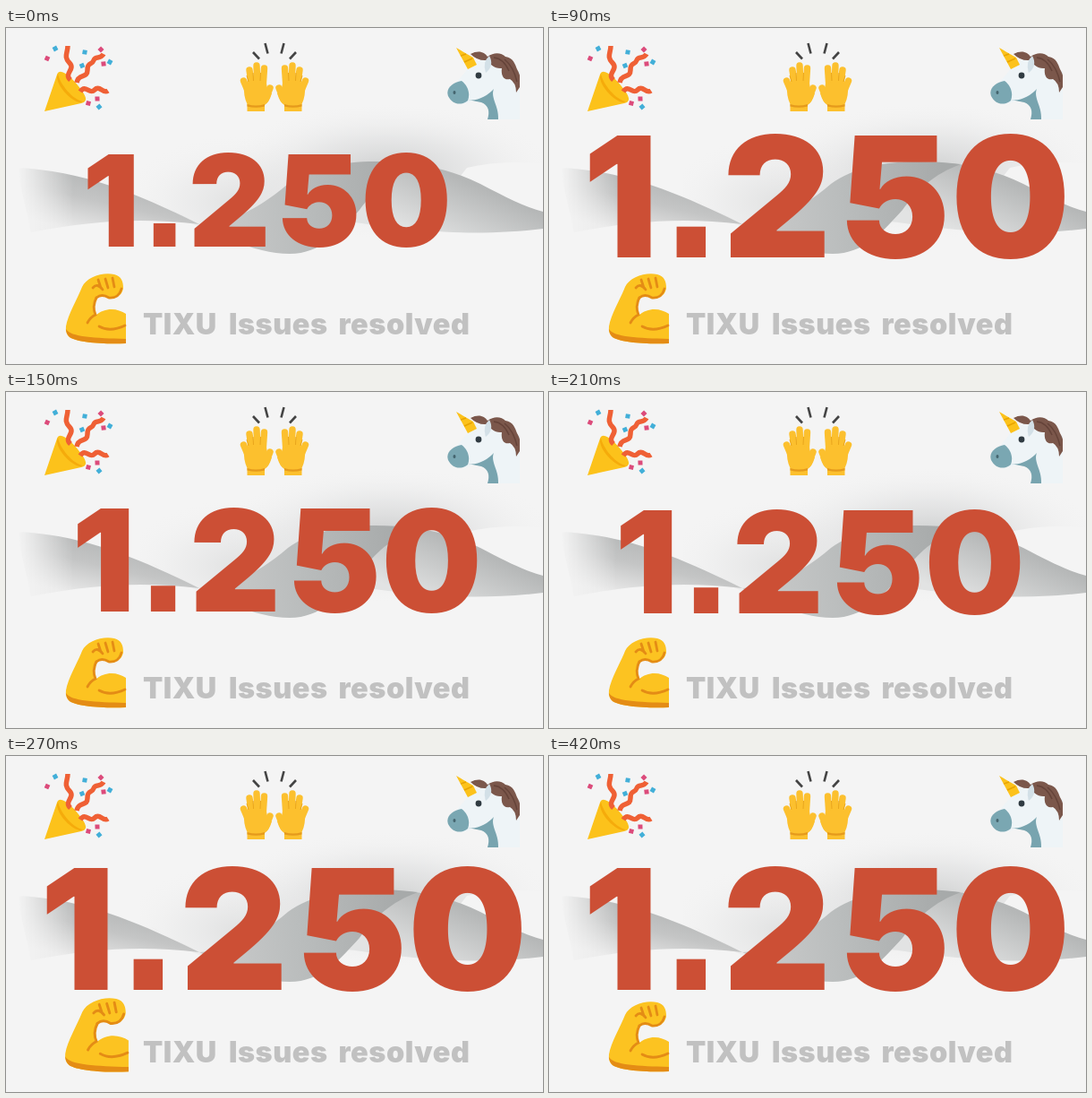
Animation, 600 px wide and 375 px high, one loop 1.53 s. Source, as an HTML page:

```html
<!DOCTYPE html>
<html lang="en">
<head>
<meta charset="utf-8">
<title>Issues resolved</title>
<style>
  html, body { margin: 0; width: 100%; height: 100%; overflow: hidden; background: #f4f4f4; }
  svg { display: block; width: 600px; height: 375px; }
  text { font-family: Inter, "Liberation Sans", sans-serif; }
  #count { font-size: 187.5px; font-weight: 900; fill: #cc4f35; }
  #count .point { font: 700 230px "Liberation Sans", sans-serif; }
  #label { font-size: 32.5px; font-weight: 900; letter-spacing: .5px; fill: #c1c1c1; }
</style>
</head>
<body>
<svg viewBox="0 0 600 375">
  <defs>
    <radialGradient id="paper" gradientUnits="userSpaceOnUse" r="1" gradientTransform="translate(310 205) scale(330 190)">
      <stop stop-color="#e5e5e5"/><stop offset=".5" stop-color="#ececec"/><stop offset="1" stop-color="#f4f4f4"/>
    </radialGradient>
    <linearGradient id="left" gradientUnits="userSpaceOnUse" x1="95" y1="160" x2="80" y2="226">
      <stop stop-color="#b4b6b6"/><stop offset=".45" stop-color="#c4c5c5"/><stop offset="1" stop-color="#e9e9e9"/>
    </linearGradient>
    <linearGradient id="fade" gradientUnits="userSpaceOnUse" x1="14" x2="75">
      <stop stop-color="#000"/><stop offset="1" stop-color="#fff"/>
    </linearGradient>
    <mask id="soft"><rect width="600" height="375" fill="url(#fade)"/></mask>
    <linearGradient id="mid" gradientUnits="userSpaceOnUse" x1="215" y1="190" x2="440" y2="160">
      <stop stop-color="#cbcccc"/><stop offset=".5" stop-color="#b9bcbc"/><stop offset="1" stop-color="#a7aaaa"/>
    </linearGradient>
    <linearGradient id="right" gradientUnits="userSpaceOnUse" x1="470" y1="235" x2="500" y2="165">
      <stop stop-color="#e2e3e3"/><stop offset="1" stop-color="#b5b7b7"/>
    </linearGradient>
    <radialGradient id="haze">
      <stop stop-color="#bcbebe" stop-opacity=".7"/><stop offset=".5" stop-color="#cdcecf" stop-opacity=".35"/>
      <stop offset="1" stop-color="#eee" stop-opacity="0"/>
    </radialGradient>
    <clipPath id="above"><path d="M150 0H600V152C570 148 540 150 515 156L450 240 215 222 150 190Z"/></clipPath>
    <clipPath id="box"><path d="M490 20H574V102H490Z"/></clipPath>
  </defs>

  <rect width="600" height="375" fill="url(#paper)"/>
  <g clip-path="url(#above)">
    <ellipse cx="425" cy="160" rx="185" ry="75" fill="url(#haze)"/>
    <ellipse cx="260" cy="195" rx="130" ry="75" fill="url(#haze)" opacity=".5"/>
  </g>
  <path d="M12 156C85 159 145 184 216 219C150 211 95 215 28 228Z" fill="url(#left)" mask="url(#soft)"/>
  <path d="M370 158C430 142 485 152 530 174C557 188 580 200 600 205V224C560 229 510 230 470 226C430 224 395 216 365 215Z" fill="url(#right)"/>
  <path d="M160 190C180 200 200 211 216 219C252 238 285 252 317 252C352 252 372 228 395 203C412 180 430 163 460 152C402 145 350 149 315 174C284 200 255 217 216 219Z" fill="url(#mid)"/>

  <!-- party popper -->
  <path d="M43 93L57 52C60 43 73 55 81 65C89 75 93 82 84 84Z" fill="#fcc21b"/>
  <path d="M58 51C60 62 74 80 86 82C78 88 52 62 58 51Z" fill="#f5ab0b"/>
  <g fill="none" stroke="#ef6035" stroke-width="5.500">
    <path d="M72 58C64 51 78 46 71 39S69 28 69 20"/>
    <path d="M79 61C81 50 91 57 91 47S96 42 98 36S105 36 109 29"/>
    <path d="M83 71C89 62 93 75 99 69S108 74 114 70"/>
  </g>
  <g id="confetti"></g>

  <!-- raised hands -->
  <g id="hand">
    <g fill="none" stroke="#fcc02e" stroke-width="7.400" stroke-linecap="round">
      <path d="M271 72L265.500 59M275 68L272 47M281 66L280 42M287 68L288.500 45M290 80L295 67"/>
    </g>
    <path d="M266 62Q279 57 291 62L293 72 297 73Q294 83 289 86V93H269.500V85Q265 76 266 62Z" fill="#fcc02e"/>
    <path d="M271 60L269 53M276.500 59L276 50M284 59L284.500 50" stroke="#e9a51c"/>
    <path d="M269.500 85Q279 88 289 85V87.500Q279 90 269.500 87.500Z" fill="#e59a1c"/>
    <path d="M276 27L283 34.500M289.500 17L292.500 28.500" stroke="#444" stroke-width="2.600"/>
  </g>
  <use href="#hand" transform="matrix(-1 0 0 1 600 0)"/>

  <!-- unicorn -->
  <g clip-path="url(#box)">
    <path d="M538 102L546 55 574 48V102Z" fill="#eaf1f5"/>
    <path d="M518 42C530 32 548 31 560 40L574 66V102H541C548 91 544 82 532 78L514 84Q502 86 496 78C493 67 509 57 518 42Z" fill="#eef4f7"/>
    <path d="M509 59C516 64 519 73 516 81C507 88 498 84 494 76C491 67 499 61 509 59Z" fill="#7aa7b2"/>
    <path d="M516 80C526 82 538 76 545 68C541 78 551 87 550 102H538C541 93 539 86 531 83Z" fill="#78a4af"/>
    <path d="M503 22L522 33 526 41 516 46Z" fill="#fcc21b"/>
    <path d="M508 31L514 29M512 38L521 34" stroke="#e8a400" stroke-width="1.500"/>
    <path d="M519 29C528 24 535 27 538 32C546 26 554 28 558 32C567 33 569 41 571 46Q577 56 574 66L570 72Q570 61 563 57C555 59 553 51 554 45C546 46 541 40 537 36Q527 37 519 29Z" fill="#7b574b"/>
    <path d="M536 50Q532 38 540 31Q546 42 536 50Z" fill="#d3e0e7"/>
    <path d="M545 33Q556 34 562 48M557 35Q567 43 571 60" fill="none" stroke="#654339" stroke-width="1.500"/>
    <circle cx="528" cy="53" r="3.400" fill="#303b42"/>
    <ellipse cx="501" cy="72" rx="1.500" ry="2" fill="#44646d"/>
  </g>

  <!-- flexed arm -->
  <g id="arm">
    <path d="M67 333C69 320 80 302 85 289C90 278 108 272 121 275C129 277 131 283 131 290C130 298 124 302 115 301C109 300 104 297 101 301C98 308 98 315 100 321C111 311 125 313 134 319V352C108 353 80 351 71 345Q66 341 67 333Z" fill="#fcc321"/>
    <path d="M67 336C72 345 100 346 134 347V352C108 353 80 351 71 345Q67 341 67 336Z" fill="#e48c15"/>
    <g fill="none" stroke="#e48c15" stroke-width="2.800" stroke-linecap="round">
      <path d="M97 290Q102 284 108 292M106 290L103 281M114 290L111 280M121 289L119 279M101 301Q107 296 115 301Q126 302 129 291"/>
      <path d="M101 301Q96 311 100 320Q94 323 91 329M104 333Q116 340 133 332"/>
    </g>
  </g>

  <text id="label" y="342"><tspan x="153">TIXU</tspan><tspan x="249">Issues</tspan><tspan x="371.500">resolved</tspan></text>
  <text id="count">1<tspan class="point">.</tspan>250</text>
</svg>
<script>
const LOOP = 1530, STEP = 30;
const count = document.getElementById("count");
const arm = document.getElementById("arm");

// Confetti: x, y, colour
const pink = "#dc4b7b", blue = "#42afd8";
document.getElementById("confetti").innerHTML = [
  [46, 34, pink], [55, 23, blue], [88, 27, blue], [106, 24, pink], [109, 40, pink],
  [116, 38, blue], [85, 42, blue], [92, 84, pink], [104, 88, blue], [102, 79, pink]
].map(([x, y, c], i) =>
  `<rect x="-2.500" y="-2.500" width="5" height="5" fill="${c}" transform="translate(${x} ${y}) rotate(${25 + i * 37})"/>`
).join("");

// Centre the ink of each character on its place in the number
const pen = document.createElement("canvas").getContext("2d");
const digitFont = '900 187.5px Inter, "Liberation Sans", sans-serif';
const pointFont = '700 230px "Liberation Sans", sans-serif';
const centres = [79.5, 159, 254, 387, 515.5];
const places = [..."1.250"].map((ch, i) => {
  pen.font = ch === "." ? pointFont : digitFont;
  const m = pen.measureText(ch);
  return centres[i] + (m.actualBoundingBoxLeft - m.actualBoundingBoxRight) / 2;
});
count.setAttribute("x", places.join(" "));

// Every 90 ms: left edge, baseline, scale
const poses = [[89.5, 244, .757], [43, 255.5, 1], [95.5, 240, .762], [43, 261, 1]];

function numberPose(t) {
  const p = Math.min(t / 90, 3), i = Math.min(Math.floor(p), 2);
  return poses[i].map((a, k) => a + (poses[i + 1][k] - a) * (p - i));
}

function draw(now) {
  const t = Math.floor((now % LOOP) / STEP) * STEP;
  const [x, y, s] = numberPose(t);
  count.setAttribute("transform", `translate(${x - 43 * s} ${y}) scale(${s})`);

  const flex = 1 + .165 * Math.max(0, 1 - Math.abs(t - 330) / 90);
  arm.setAttribute("transform", `translate(81 347) scale(${flex}) translate(-81 -347)`);
}

const start = performance.now();
function tick() {
  draw(performance.now() - start);
  requestAnimationFrame(tick);
}
tick();
</script>
</body>
</html>
```
